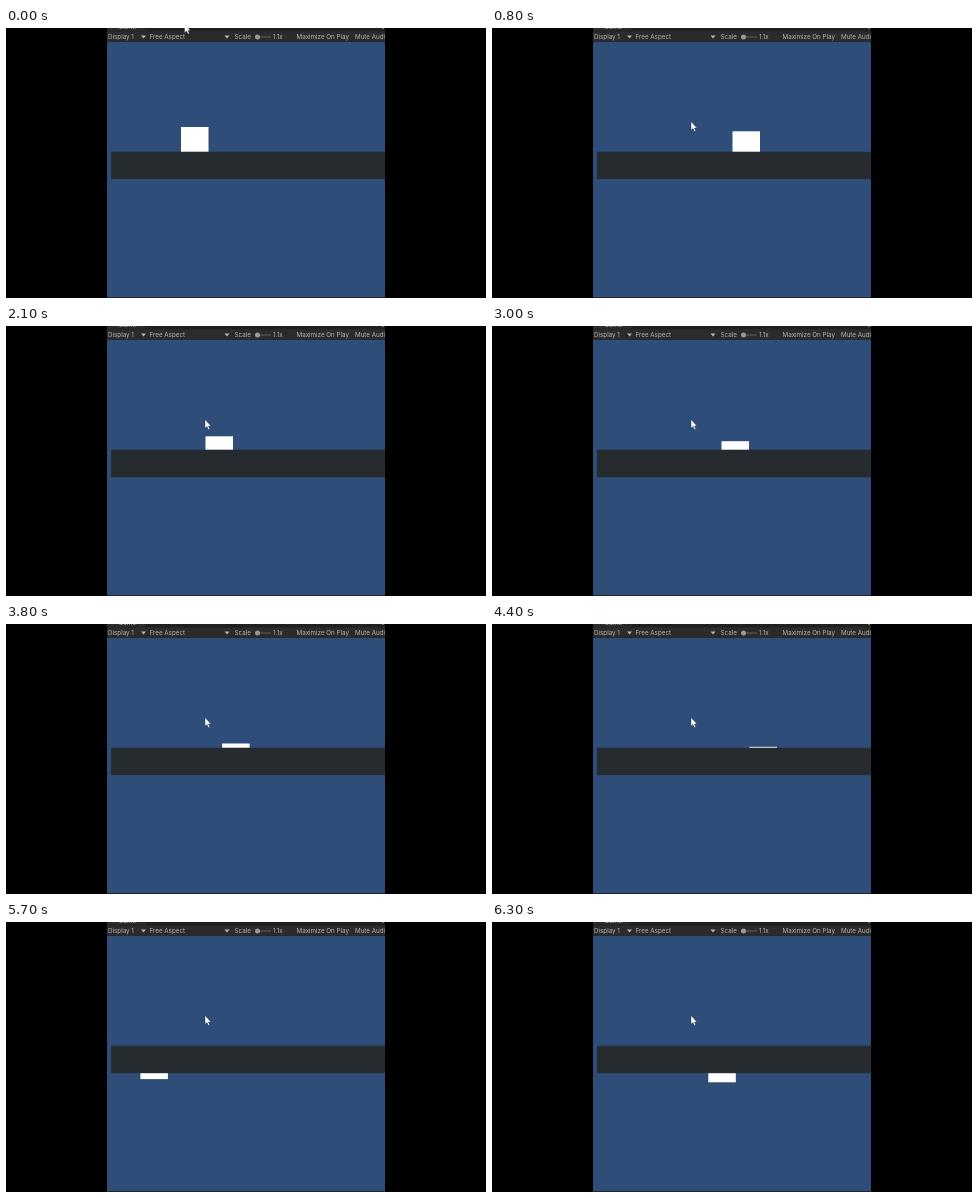
An HTML page for the animation above (6400 ms loop, 480 px wide and 270 px high).

```html
<!DOCTYPE html>
<html lang="en">
<head>
<meta charset="utf-8">
<title>Sinking square</title>
<style>
  html, body { margin: 0; width: 100%; height: 100%; overflow: hidden; background: #000; }
  svg { display: block; width: 100vw; height: 100vh; }
  text { font: 6.25px Inter, sans-serif; fill: #b4b4b4; }
</style>
</head>
<body>
<svg viewBox="0 0 480 270">
  <defs>
    <clipPath id="view"><rect x="101" width="278" height="270"/></clipPath>
  </defs>
  <rect width="480" height="270"/>
  <g clip-path="url(#view)">
    <rect x="101" width="278" height="270" fill="#2f4d79"/>
    <rect id="box" width="27.5" height="27.3" fill="#fff"/>
    <rect x="105" y="123.7" width="274" height="27.5" fill="#262b2f"/>
    <rect x="101" y="269" width="278" height="1" fill="#20252d"/>

    <rect x="101" width="278" height="14" fill="#2b2b2b"/>
    <rect x="139" width="240" height="3" fill="#202020"/>
    <rect x="101" y="2.6" width="278" height=".8" fill="#1e1e1e"/>
    <rect x="101" y="13" width="278" height="1" fill="#252a32"/>
    <text x="112.5" y="1.3">Game</text>
    <circle cx="377" cy=".5" r=".7" fill="#999"/>
    <text x="102" y="11">Display 1</text>
    <text x="143.5" y="11">Free Aspect</text>
    <text x="228.5" y="11">Scale</text>
    <text x="267" y="11">1.1x</text>
    <text x="290.5" y="11">Maximize On Play</text>
    <text x="349" y="11">Mute Audio</text>
    <path d="M135 7.5h5l-2.5 3zM218.500 7.500h5l-2.500 3z" fill="#b4b4b4"/>
    <path d="M249 9h16" stroke="#606060"/>
    <circle cx="251.500" cy="9" r="2.500" fill="#999"/>
  </g>
  <path id="cursor" d="M0 0V8.800L2 7L3.400 10L4.800 9.400L3.500 6.500H6Z" fill="#fff" stroke="#1c2634" stroke-width=".4"/>
</svg>
<script>
const LOOP = 6400, STEP = 100;
const box = document.getElementById('box');
const cursor = document.getElementById('cursor');

// [time, left edge]: steady runs between turning points
const path = [
  [0, 175], [160, 153], [800, 240.5], [820, 242.5], [1030, 242.5],
  [1726, 148.5], [2100, 199.5], [2660, 276], [3449, 168],
  [4251, 277.8], [5499, 107], [6400, 230]
];

function along(points, t) {
  const i = Math.max(1, points.findIndex(p => p[0] >= t));
  const [t0, x0] = points[i - 1], [t1, x1] = points[i];
  return x0 + (x1 - x0) * (t - t0) / (t1 - t0);
}

function draw(now) {
  const t = Math.floor(now % LOOP / STEP) * STEP;
  box.setAttribute('x', along(path, t).toFixed(1));
  box.setAttribute('y', (99 + t * 0.0054).toFixed(1));

  const k = Math.min(1, t / 500);
  const ease = k * (2 - k);
  cursor.setAttribute('transform', `translate(${178.5 + 20.5 * ease} ${-4 + 97.5 * ease})`);
}

const start = performance.now();
function tick() {
  draw(performance.now() - start);
  requestAnimationFrame(tick);
}
tick();
</script>
</body>
</html>
```
